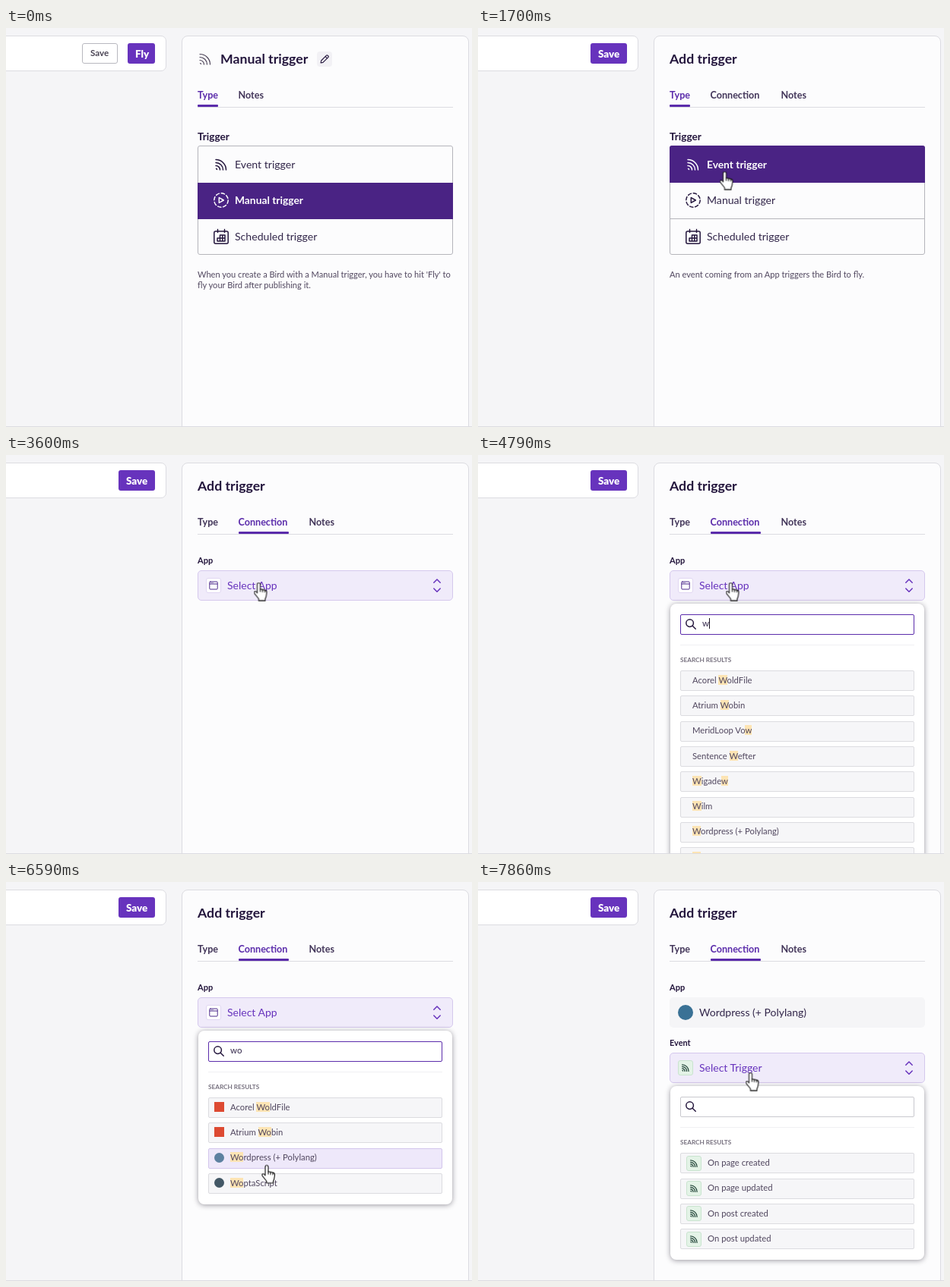
An HTML page for the animation above (8 s loop, 613 by 526 pixels).

```html
<!DOCTYPE html>
<html lang="en">
<head>
<meta charset="utf-8">
<title>Add trigger</title>
<style>
html, body { margin: 0; width: 100%; height: 100%; overflow: hidden; background: #f5f5f7; }
#stage { position: absolute; left: 0; top: 0; width: 613px; height: 526px; overflow: hidden; }
#stage div, #stage p, #stage svg, section { position: absolute; box-sizing: border-box; margin: 0; }
section { inset: 0; }
p { white-space: pre; }
svg { overflow: visible; fill: none; stroke-linecap: round; stroke-linejoin: round; }
mark { background: #fde4b3; color: inherit; }
</style>
</head>
<body>
<div id="stage"></div>
<script>
const LOOP = 8000;
const INK = '#24163d', BODY = '#32264a', SOFT = '#51475f', PURPLE = '#6733bd', DEEP = '#4a2384';
const LINE = '1px solid #dcdce1';

// Drawing helpers: text is placed by its left edge and the middle of its line.
const box = (x, y, w, h, css, inner = '') =>
  `<div style="left:${x}px;top:${y}px;width:${w}px;height:${h}px;${css}">${inner}</div>`;
const text = (x, y, size, color, str, weight = 400) =>
  `<p style="left:${x}px;top:${y - 10}px;font:${weight} ${size}px/20px Lato,sans-serif;color:${color}">${str}</p>`;
const icon = (x, y, size, grid, color, width, shapes) =>
  `<svg style="left:${x}px;top:${y}px" width="${size}" height="${size}" viewBox="0 0 ${grid} ${grid}" stroke="${color}" stroke-width="${width}">${shapes}</svg>`;
const dot = (x, y, d, color, round = true) =>
  box(x, y, d, d, `background:${color};border-radius:${round ? '50%' : 0}`);

// Shows its content from one time to another, optionally starting half faded.
const during = (from, to, inner, fade = 0) =>
  `<section data-from="${from}" data-to="${to}" data-fade="${fade}">${inner}</section>`;

const feed = (x, y, size, color, width = 1.5) => icon(x, y, size, 16, color, width,
  '<path d="M1 1.5A13.5 13.5 0 0 1 14.5 15M1 5.5A9.5 9.5 0 0 1 10.5 15M1 9.5A5.5 5.5 0 0 1 6.5 15M1.5 13.5a1 1 0 0 1 1 1"/>');
const play = (y, color) => icon(273, y, 20, 20, color, 1.5,
  '<circle cx="10" cy="10" r="9.2" stroke-dasharray="4.4 2.82"/><path d="M7.3 6.6v6.8l6-3.4z"/>');
const calendar = y => icon(273, y, 20, 20, INK, 1.5,
  '<rect x=".8" y="3" width="18.4" height="16.2" rx="2"/><path d="M5.5.5v4M14.5.5v4M8.5 8v8M11.8 8v8M15 8v8M5 12v4M5 12h10M5 16h10M8.5 8H15"/>');
const pencil = box(409, 31, 20, 20, 'background:#f2f1f5;border-radius:4px') +
  icon(413, 35, 12, 12, INK, 1.1, '<path d="M1 11l.7-3L8.5 1.2q.8-.8 1.6 0l.8.8q.8.8 0 1.6L4 10.4zM7.2 2.6l2.3 2.3"/>');
const chevrons = y => icon(562, y - 9, 18, 18, PURPLE, 1.5, '<path d="M.8 5.2L5 1l4.2 4.2M.8 13l4.2 4.2L9.2 13"/>');
const lens = y => icon(273, y - 7, 14, 14, INK, 1.5, '<circle cx="5.6" cy="5.6" r="4.8"/><path d="M9.2 9.2l4 4"/>');

function tabs(items, active) {
  return box(252, 104, 336, 1, 'background:#dcdce1') + items.map(([x, w, label]) =>
    text(x, 88.5, 12.6, label === active ? '#5b2cab' : '#43365a', label, 700) +
    (label === active ? box(x, 101, w, 3, 'background:#5b2cab;border-radius:1px') : '')).join('');
}

function triggerList(selected, notes) {
  const rows = [['Event trigger', 155, 49], ['Manual trigger', 204, 48], ['Scheduled trigger', 252, 47]];
  const icons = [c => feed(275, 172, 16, c), c => play(217, c), () => calendar(265)];
  return text(252, 142.5, 13.6, INK, 'Trigger', 700) +
    box(252, 155, 336, 144, 'border:1px solid #b5b5bb;border-radius:3px') +
    box(252, 251, 336, 1, 'background:#b5b5bb') +
    rows.map(([label, y, h], i) => {
      const on = i === selected;
      return (on ? box(252, y, 336, h, `background:${DEEP};border-radius:${i ? 0 : '3px 3px 0 0'}`) : '') +
        icons[i](on ? '#fff' : INK) +
        text(301, [179.5, 226.5, 274.5][i], on ? 13.8 : 14.1, on ? '#fff' : BODY, label, on ? 700 : 400);
    }).join('') +
    notes.map((line, i) => text(252, 325 + 14 * i, 11.1, SOFT, line)).join('');
}

const windowIcon = box(263, 162, 20, 20, 'background:#fff;border:1px solid #e0d6f2;border-radius:3px') +
  icon(267, 166, 12, 12, '#4d2a8c', 1, '<rect x=".8" y="1" width="10.4" height="10" rx="1"/><path d="M1 4h10M3 2.5h.1M5 2.5h.1"/>');
const greenFeed = (x, y) =>
  box(x, y, 20, 20, 'background:#e4f3e7;border:1px solid #c9e4cf;border-radius:3px') + feed(x + 5, y + 5, 10, '#24463a', 2);

const select = (y, label, hover, badge) =>
  box(252, y, 336, 40, `background:${hover ? '#f0ebfa' : '#f6f3fc'};border:1px solid ${hover ? '#d5c8ed' : '#e4dcf3'};border-radius:5px`) +
  badge + text(291, y + 19.5, 14, PURPLE, label) + chevrons(y + 20);

const ROW = 33.3;
const row = (y, hover) => box(266, y, 308, 27,
  `background:${hover ? '#eee8fa' : '#f6f6f8'};border:1px solid ${hover ? '#d3c6ec' : '#dcdce0'};border-radius:2px`);

function dropdown(y, names, { typed = '', focus = true, textX = 282, badge = () => '', hover = -1 } = {}) {
  const lit = name => typed ? name.replace(RegExp(typed, 'gi'), m => `<mark>${m}</mark>`) : name;
  return box(253, y, 334, 96 + ROW * names.length, 'background:#fff;border-radius:8px;box-shadow:0 1px 7px rgba(20,15,30,.42)') +
    box(266, y + 14, 308, 27, `border:1px solid ${focus ? '#5b2cab' : '#c9c9ce'};border-radius:2px;background:#fff`) +
    lens(y + 27) + text(295, y + 26, 11.5, BODY, typed) +
    box(266, y + 54, 308, 1, 'background:#f0f0f3') +
    text(266, y + 74, 8.2, '#77717f', 'SEARCH RESULTS', 700) +
    names.map((name, i) => {
      const top = y + 88 + ROW * i;
      return row(top, i === hover) + badge(i, top) + text(textX, top + 12.6, 11.3, SOFT, lit(name));
    }).join('');
}

const caret = x => box(x, 215, 1.5, 14, 'background:#16101f');

const ALL = ['Acorel WoldFile', 'Atrium Wobin', 'Belvano', 'Cindral Desk', 'Dorvane Sheets', 'MeridLoop Vow', 'Orlinda Mail', 'Sentence Wefter'];
const WITH_W = ['Acorel WoldFile', 'Atrium Wobin', 'MeridLoop Vow', 'Sentence Wefter', 'Wigadew', 'Wilm', 'Wordpress (+ Polylang)', 'WoptaScript'];
const WITH_WO = WITH_W.filter(name => /wo/i.test(name));
const EVENTS = ['On page created', 'On page updated', 'On post created', 'On post updated'];

const RED = '#dd4a32', BLUE = '#5d81a0', SLATE = '#435866';
const appBadge = (i, y) => dot(274, y + 6, 13, [RED, RED, BLUE, SLATE][i % 4], i % 4 > 1);
const woList = hover => dropdown(196, WITH_WO, { typed: 'wo', textX: 295, badge: appBadge, hover });
const hovers = [[5190, -1], [5990, 0], [6055, 1], [6120, 2], [6195, 3], [6430, 2], [6730]];

const hand = `<svg id="hand" width="1" height="1" style="left:0;top:0" stroke="#111" stroke-width="1.1">
  <path fill="#fff" d="M-2 2a2 2 0 0 1 4 0v6.2l6.3 1.4q2.4.6 2.2 3.2l-.8 5q-.3 1.8-1.2 3v2.4h-8.6v-2.2L-5.8 13.8q-1-1.6.4-2.4 1.2-.6 2.3.6L-2 13.3z"/>
  <path d="M2 8v3.6M5 9v3M8 9.8v2.4"/></svg>`;
const click = y => dot(309, y - 15, 30, '#fff36b;mix-blend-mode:multiply');
const saveButton = (x, w, label) => box(x, 20, w, 27, `background:${PURPLE};border-radius:3px`) +
  text(x + 10, 33.5, 13.4, '#fff', label, 900);

const allTabs = [[252, 27, 'Type'], [305.5, 66, 'Connection'], [398.5, 33, 'Notes']];

document.getElementById('stage').innerHTML = [
  box(-20, 10, 231, 47, `background:#fff;border:${LINE};border-radius:7px`),
  box(231, 10, 378, 540, `background:#fcfcfd;border:${LINE};border-radius:8px`),

  during(0, 1700,
    box(100, 20, 47, 27, 'background:#fff;border:1px solid #b8b8bf;border-radius:3px') +
    text(111, 33, 11.6, '#4a4454', 'Save', 700) + saveButton(160, 36, 'Fly') +
    feed(254, 33, 16, '#4b4257', 1.2) + text(282, 40.5, 17.7, INK, 'Manual trigger', 700) + pencil),
  during(1700, LOOP, saveButton(148, 48, 'Save') + text(252, 40.5, 17.7, INK, 'Add trigger', 700)),

  during(0, 1310, tabs([[252, 27, 'Type'], [305.5, 33, 'Notes']], 'Type') + triggerList(1,
    ["When you create a Bird with a Manual trigger, you have to hit 'Fly' to", 'fly your Bird after publishing it.'])),
  during(1310, 2710, tabs(allTabs, 'Type') +
    triggerList(0, ['An event coming from an App triggers the Bird to fly.'])),

  during(2710, LOOP, tabs(allTabs, 'Connection') + text(252, 138.5, 11, INK, 'App', 700)),
  during(2710, 3200, select(152, 'Select App', false, windowIcon)),
  during(3200, 6730, select(152, 'Select App', true, windowIcon)),
  during(6730, LOOP, box(252, 152, 336, 40, 'background:#f5f5f7;border-radius:5px') +
    dot(263, 162, 20, '#3a7195') + text(291, 171.5, 14, BODY, 'Wordpress (+ Polylang)')),
  during(6800, LOOP, text(252, 211.5, 10.9, INK, 'Event', 700)),
  during(6800, 7600, select(225, 'Select Trigger', false, greenFeed(263, 235))),
  during(7600, LOOP, select(225, 'Select Trigger', true, greenFeed(263, 235))),

  during(4400, 4470, dropdown(196, ALL), .5),
  during(4470, 4790, dropdown(196, ALL, { textX: 295, badge: appBadge }) + caret(295)),
  during(4790, 5060, dropdown(196, WITH_W, { typed: 'w' }) + caret(303.5)),
  during(5060, 5190, dropdown(196, WITH_WO, { typed: 'wo' })),
  ...hovers.slice(0, -1).map(([from, i], k) => during(from, hovers[k + 1][0], woList(i))),
  during(5060, 5520, caret(309.5)),
  during(6050, 6590, caret(309.5)),
  during(7790, LOOP, dropdown(269.3, EVENTS, { focus: false, textX: 302, badge: (i, y) => greenFeed(274, y + 3.5) }), .5),

  box(0, 525, 613, 1, 'background:#dcdce1'),
  during(1240, 1440, click(190)),
  during(2510, 2710, click(97)),
  during(330, LOOP, hand)
].join('');

const start = document.timeline.currentTime;
function loop(el, frames) {
  el.animate(frames, { duration: LOOP, iterations: Infinity }).startTime = start;
}

for (const el of document.querySelectorAll('section')) {
  const from = +el.dataset.from, to = +el.dataset.to, fade = +el.dataset.fade;
  const levels = from ? [[0, 0], [from, 0]] : [];
  levels.push([from, fade || 1]);
  if (fade) levels.push([from + 70, fade]);
  if (to > from + 70 || !fade) levels.push([fade ? from + 70 : from, 1], [to, 1]);
  if (to < LOOP) levels.push([to, 0], [LOOP, 0]);
  loop(el, levels.map(([t, opacity]) => ({ offset: t / LOOP, opacity })));
}

// Pointer path: time, x, y of the fingertip.
const path = [
  [0, 465, 326], [330, 465, 326], [850, 334, 167], [1170, 324.5, 189.5], [1900, 324.5, 189.5],
  [2440, 324.5, 97], [2920, 324.5, 97], [3200, 331, 150], [3660, 332.5, 168.5], [5720, 332.5, 168.5],
  [5850, 334, 190], [6120, 343, 350], [6250, 346, 400], [6500, 343, 373.5], [7250, 343, 373.5],
  [7650, 358.5, 251.5], [LOOP, 358.5, 251.5]
];
loop(document.getElementById('hand'), path.map(([t, x, y], i) => {
  const next = path[i + 1] ? path[i + 1][0] : t;
  return {
    offset: t / LOOP,
    transform: `translate(${x}px, ${y}px)`,
    easing: `steps(${Math.max(1, Math.round((next - t) / 67))}, start)`
  };
}));
</script>
</body>
</html>
```
